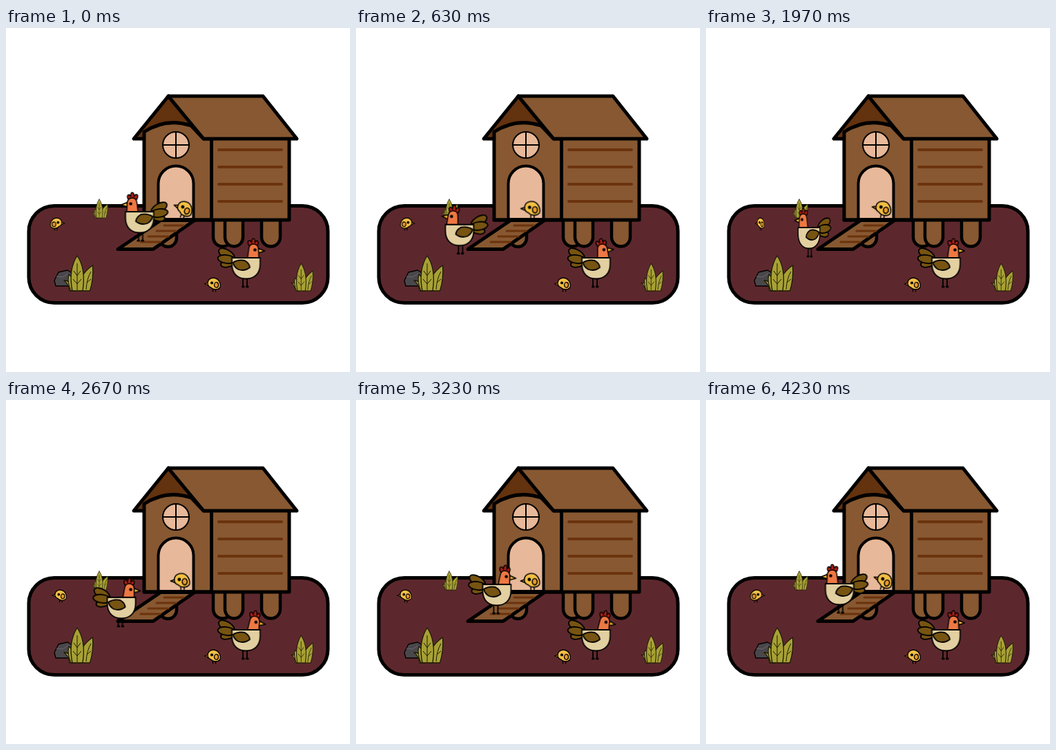
An HTML page for the animation above (4.53 s loop, 498 by 500 pixels).

```html
<!DOCTYPE html>
<html lang="en">
<head>
<meta charset="utf-8">
<title>Chicken coop</title>
<style>
  html, body { margin: 0; width: 100%; height: 100%; overflow: hidden; background: #fff; }
  svg { display: block; width: 498px; height: 500px; }
  .line { stroke: #000; stroke-linejoin: round; stroke-linecap: round; }
  .wood { fill: #875831; }
  .slat { stroke: #6b330d; stroke-linecap: round; fill: none; }
  .anim { animation: 4530ms ease-in-out infinite; }
  .hen-walk { animation-name: hen-walk; }
  .hen-climb { animation-name: hen-climb; }
  .hen-turn { animation-name: hen-turn; }
  .hen-nod { animation-name: hen-nod; transform-origin: 10px 0; }
  .rest-nod { animation-name: rest-nod; transform-origin: 10px 0; }
  .chick-walk { animation-name: chick-walk; }
  .chick-turn { animation-name: chick-turn; }
  .chick-rock { animation-name: chick-rock; transform-origin: 0 9px; }

  @keyframes hen-walk {
    0%, 75.7%, 100% { transform: translateX(200.5px); }
    16.6%, 53.6% { transform: translateX(154.5px); }
  }
  @keyframes hen-climb {
    0%, 74.4%, 100% { transform: translateY(267px); }
    19.9%, 53.6% { transform: translateY(290px); }
  }
  @keyframes hen-turn {
    0%, 40.4% { transform: scaleX(-1); }
    53.6%, 80.2% { transform: scaleX(1); }
    93.4%, 100% { transform: scaleX(-1); }
  }
  @keyframes hen-nod {
    0%, 43%, 93.4%, 100% { transform: rotate(0deg); }
    14% { transform: rotate(-7deg); }
    31.5% { transform: rotate(4deg); }
    72% { transform: rotate(4deg); }
  }
  @keyframes rest-nod {
    0%, 93.4%, 100% { transform: rotate(0deg); }
    16% { transform: rotate(-8deg); }
    43.5% { transform: rotate(0deg); }
    65% { transform: rotate(8deg); }
  }
  @keyframes chick-walk {
    0%, 13.2%, 72.8%, 100% { transform: translate(72.2px, 284px); }
    25%, 59.6% { transform: translate(79.5px, 284px); }
  }
  @keyframes chick-turn {
    0%, 35.3% { transform: scaleX(-1); }
    47%, 80.2% { transform: scaleX(1); }
    92%, 100% { transform: scaleX(-1); }
  }
  @keyframes chick-rock {
    0%, 93.4%, 100% { transform: rotate(20deg); }
    14%, 32% { transform: rotate(0deg); }
    43.5% { transform: rotate(9deg); }
    59%, 72% { transform: rotate(-2deg); }
  }
</style>
</head>
<body>
<svg viewBox="0 0 498 500">
  <defs>
    <g id="grass" fill="#a8a135" stroke="#1c1a06" stroke-linejoin="round" stroke-width="1.3">
      <path d="M-12 0Q-13-10-20-15Q-9-15-3 0Z"/>
      <path d="M-10 0Q-16-13-13-24Q-3-16-2 0Z"/>
      <path d="M1 0Q1-23 21.5-37Q23-18 17.5 0Z"/>
      <path d="M-8 0Q-14-30-1-51Q12-32 7 0Z"/>
      <path d="M-1-1V-40M-1-10l-6-7M-1-10l6-7M-1-22l-5-7M-1-22l5-7M12-2Q13-18 19-28M13-12l6-5" fill="none" stroke-width="1"/>
    </g>

    <g id="hen-back" class="line" stroke-width="1.8">
      <g fill="#775411">
        <ellipse cx="-25" cy="7" rx="12" ry="6" transform="rotate(-18 -25 7)"/>
        <ellipse cx="-28" cy="-5" rx="13" ry="6.5" transform="rotate(32 -28 -5)"/>
        <ellipse cx="-28" cy="2" rx="13" ry="6" transform="rotate(8 -28 2)"/>
      </g>
      <path d="M-4.5 29V42M1.5 29V42" fill="none"/>
      <path d="M-5 42h1.5M1 42h1.5" stroke-width="3.2"/>
    </g>
    <g id="hen-head" class="line" stroke-width="1.5">
      <path d="M4-18Q1-25 5-25Q7-25 8-22Q8-28 11-28Q13-28 13-22Q15-26 17-24Q19-22 16-17Z" fill="#a91d14"/>
      <path d="M18-13.5L27-10L18-7Z" fill="#f0b32b"/>
      <path d="M2.5 4V-2L4-13Q5-20 10.5-20Q17-20 18-13L18.5-2V4Z" fill="#ee7843"/>
      <circle cx="13" cy="-11.5" r="1.6" fill="#000"/>
    </g>
    <g id="hen-body" class="line" stroke-width="1.8">
      <path d="M-20.5 0H20.5V9C20.5 24 11 30.5 0 30.5S-20.5 24-20.5 9Z" fill="#e3d0a1"/>
      <path d="M-19 7Q-11 2-2 4Q5 8 5.5 14Q-2 20-11 17Q-17 14-19 7Z" fill="#775411"/>
    </g>

    <g id="chick" class="line" stroke-width="1.3">
      <path d="M-2 7V11M2 7V11" fill="none"/>
      <path d="M-8-2L-14 0L-8 2.5Z" fill="#e99a2c"/>
      <path d="M-9.5-1C-9.5-7-4-9.5 1-8.5C7-7 10 0 8.5 5C5 9.5-2 8.5-5 5C-8 4-9.5 2-9.5-1Z" fill="#f2be45"/>
      <ellipse cx="3" cy="1.5" rx="3" ry="3.8" fill="#e9982b"/>
      <circle cx="-3.5" cy="-1.5" r="1.4" fill="#000"/>
    </g>
  </defs>

  <rect class="line" x="33" y="258.5" width="433" height="141" rx="37" fill="#5d282d" stroke-width="5"/>

  <g class="line wood" stroke-width="4.5">
    <path d="M222 276V305a12.5 13 0 0 0 25 0V276Z"/>
    <path d="M300 276V304a13.5 13.5 0 0 0 27 0V276Z"/>
    <path d="M317 276V304a13 13.5 0 0 0 26 0V276Z"/>
    <path d="M370 276V304a13.5 13.5 0 0 0 27 0V276Z"/>
  </g>
  <g class="line wood" stroke-width="5">
    <path d="M235 99L185 161H286Z" fill="#63320f"/>
    <rect x="297.5" y="158" width="112.5" height="121"/>
    <path d="M200 279V151Q232 130 268 142L286 161H297.5V279Z"/>
    <path d="M235 99H372L421 161H286Z"/>
  </g>
  <path class="slat" d="M308 177H399M308 202H399M308 227H399M308 252H399" stroke-width="4"/>
  <g class="line" fill="#e7b899">
    <circle cx="246" cy="170" r="19" stroke-width="2"/>
    <path d="M246 151V189M227 170H265" stroke-width="2"/>
    <path d="M220.5 278V226a25.5 25.5 0 0 1 51 0V278Z" stroke-width="4"/>
  </g>
  <path class="line" d="M200 279H297.5" stroke-width="5"/>
  <path class="line wood" d="M224 279.5H273L213 321.5H162Z" stroke-width="5"/>
  <path class="slat" d="M229 287H257M218 295H246M206 303H235M195 311H223" stroke-width="3"/>

  <use href="#grass" transform="translate(135.5 276) scale(.54)"/>
  <path class="line" d="M70 367L76 355L89 352L99 358V375H72Z" fill="#4a474b" stroke-width="1.4"/>
  <path d="M73 361L82 362L90 357" fill="none" stroke="#6a656c"/>
  <use href="#grass" transform="translate(104 382)"/>
  <use href="#grass" transform="translate(428 382) scale(.75 .78)"/>

  <g transform="translate(255.5 262.5) scale(1.2)">
    <g class="anim chick-rock"><use href="#chick"/></g>
  </g>
  <g class="anim chick-walk">
    <g class="anim chick-turn"><use href="#chick" transform="scale(.9)"/></g>
  </g>
  <use href="#chick" transform="translate(301.5 372)"/>

  <g transform="translate(347.5 334)">
    <use href="#hen-back"/>
    <g class="anim rest-nod"><use href="#hen-head"/></g>
    <use href="#hen-body"/>
  </g>

  <g class="anim hen-walk">
    <g class="anim hen-climb">
      <g class="anim hen-turn">
        <g transform="translate(7 0)">
          <use href="#hen-back"/>
          <g class="anim hen-nod"><use href="#hen-head"/></g>
          <use href="#hen-body"/>
        </g>
      </g>
    </g>
  </g>
</svg>
</body>
</html>
```
